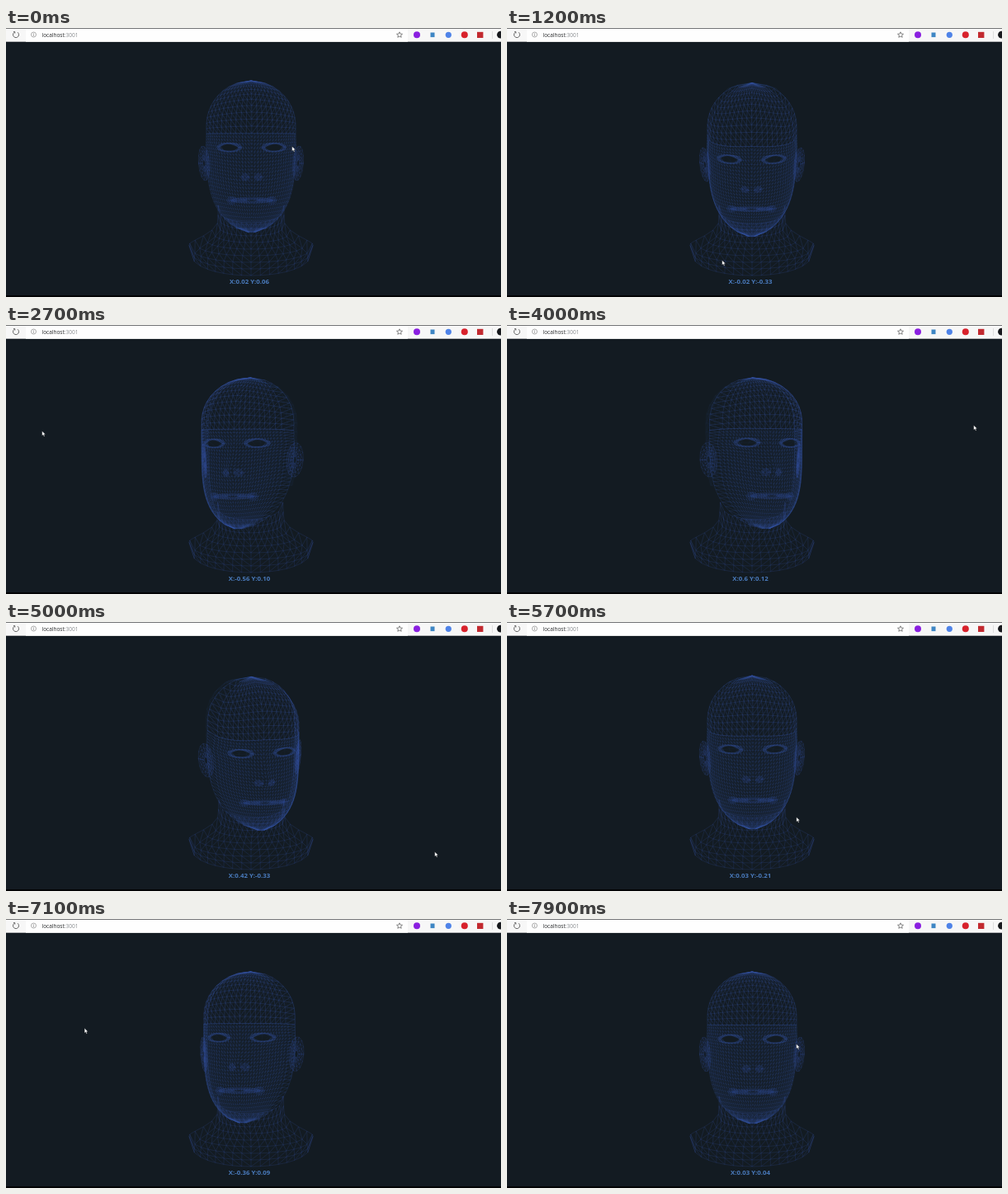
Recreate the animation shown at these times as an HTML page with a canvas. Size 600 by 326 pixels, loop 8000 ms.

```html
<!DOCTYPE html>
<html lang="en">
<head>
<meta charset="utf-8">
<title>Head follows the pointer</title>
<style>
  html, body { margin: 0; width: 100%; height: 100%; overflow: hidden; background: #131b22; }
  #stage { position: relative; width: 600px; height: 326px; overflow: hidden; }
  #stage > * { position: absolute; left: 0; top: 0; }
  text { font-family: "Open Sans", "Noto Sans", sans-serif; }
</style>
</head>
<body>
<div id="stage">
  <canvas id="view" width="600" height="326"></canvas>
  <svg width="600" height="326" viewBox="0 0 600 326">
    <rect width="600" height="16.7" fill="#f7f7f7"/>
    <rect x="24" y="1" width="463" height="15.7" fill="#fefefe"/>
    <rect width="600" height=".7" fill="#3a3c3e"/>
    <rect y="324" width="600" height="2" fill="#020304"/>
    <g fill="none" stroke="#555" stroke-width=".9">
      <path d="M9.8 5.4A3.5 3.5 0 1 0 14 5.2M9 4.6h1.8v1.9"/>
      <circle cx="33.5" cy="8" r="3" stroke="#888" stroke-width=".7"/>
      <path d="M33.5 7.5v2.2M33.5 6v.7" stroke="#777" stroke-width=".7"/>
      <path d="M477 4.8l1 2.3 2.5.2-1.9 1.6.6 2.4-2.2-1.3-2.2 1.3.6-2.4-1.9-1.6 2.5-.2z" stroke-width=".7"/>
      <path d="M589.5 4v9" stroke="#ccc" stroke-width=".6"/>
    </g>
    <text x="43.5" y="10.6" font-size="6.5" fill="#26282a">localhost<tspan fill="#85898c">:3001</tspan></text>
    <circle cx="498" cy="8.3" r="4" fill="#8a1fe0"/>
    <rect x="514.5" y="5.5" width="5" height="5.6" fill="#3f86c4"/>
    <circle cx="536.3" cy="8.3" r="3.6" fill="#4f83e8"/>
    <circle cx="555.8" cy="8.3" r="4" fill="#d8222c"/>
    <rect x="571" y="4.8" width="7.4" height="7.2" fill="#c22a30"/>
    <circle cx="599.5" cy="8.2" r="4.4" fill="#16181c"/>
    <text id="label" x="295" y="310" font-size="7.85" font-weight="700" fill="#4a7bbd" text-anchor="middle"></text>
    <path id="pointer" d="M0 0L0 5.8L1.4 4.7L2.3 6.8L3.3 6.4L2.4 4.3L4.1 4.1Z" fill="#fff" stroke="#0a0d10" stroke-width=".35"/>
  </svg>
</div>
<script>
const LOOP = 8000, STEP = 100, CX = 297, PIVOT = 195;

const clamp = v => Math.max(0, Math.min(1, v));
const smooth = v => (v = clamp(v)) * v * (3 - 2 * v);
const bump = (d, s) => Math.exp(-d * d / (2 * s * s));

// Pointer path: time, x, y
const path = [
  [0, 347, 144], [600, 325, 215], [1200, 261, 282], [1800, 86, 195], [2300, 45, 136],
  [2700, 44, 129], [3300, 300, 124], [4000, 566, 122], [4500, 565, 220], [5000, 520, 279],
  [5500, 420, 262], [6400, 94, 136], [6900, 52, 130], [7900, 351, 152]
];
const pathAt = (t, col) => {
  const last = path.length - 1;
  if (t >= path[last][0]) return path[last][col];
  const slope = i => {
    const a = path[Math.max(i - 1, 0)], b = path[Math.min(i + 1, last)];
    return (b[col] - a[col]) / (b[0] - a[0]);
  };
  const i = path.findIndex(p => p[0] > t) - 1;
  const [p, q] = [path[i], path[i + 1]], d = q[0] - p[0], s = (t - p[0]) / d, r = 1 - s;
  return p[col] * (1 + 2 * s) * r * r + slope(i) * d * s * r * r
       + q[col] * s * s * (3 - 2 * s) - slope(i + 1) * d * s * s * r;
};
const readX = x => Math.sign(x - 300) * .755 * Math.abs((x - 300) / 300) ** 1.9;
const readY = y => .00285 * (164.5 - y);

// Head profile by height: a round dome above TEMPLE, a tapering jaw below.
const TOP = 64, TEMPLE = 118, CHIN = 248, BROW = 128;
const dome = y => Math.sqrt(clamp(1 - (Math.max(0, TEMPLE - y) / (TEMPLE - TOP)) ** 2));
const jaw = y => clamp((y - TEMPLE) / (CHIN - TEMPLE));
const width = y => 54 * dome(y) * (1 - jaw(y) ** 4) ** .6;
const front = y => 74 * dome(y) + 5 * bump(y - 209, 25) - 14 * jaw(y) ** 8;
const middle = y => 52 * jaw(y) ** 4;
const back = y => -75 * dome(y) * (1 - .4 * jaw(y) ** 2);
const pitchShare = y => 1 - .55 * smooth((y - 160) / 90);

const nose = y => 15 * clamp((y - 138) / 40) ** 2 * clamp((192 - y) / 14);
const round = u => (1 - Math.min(1, Math.abs(u)) ** 4) ** .4;
const surface = (x, y) => {
  const c = middle(y), side = Math.abs(x);
  return c + (front(y) - c) * round(x / Math.max(.01, width(y))) + nose(y) * bump(x, 7)
    + 3 * bump(side - 20, 12) * bump(y - 132, 5) - 5 * bump(side - 27, 9) * bump(y - 145, 6)
    + 3 * bump(x, 15) * bump(y - 209, 6);
};

// Mesh lines flow around the eye openings.
const eyes = [-27, 27].map(x => ({ x, y: 145, rx: 11, ry: 3.4 }));
const reach = (e, x, y) => Math.hypot((x - e.x) / e.rx, (y - e.y) / e.ry);
const openEyes = (x, y) => {
  for (const e of eyes) {
    const r = Math.max(.05, reach(e, x, y)), k = Math.cbrt(1 + r ** 3) / r;
    if (r > 5) continue;
    x = e.x + (x - e.x) * k;
    y = e.y + (y - e.y) * k;
  }
  return [x, y];
};
const inEye = (a, b) => eyes.some(e => reach(e, (a.x + b.x) / 2, (a.y + b.y) / 2) < .85);

const points = [], patches = [];
const vertex = (x, y, z, m = 1) => {
  const p = { x, y, z, m, share: pitchShare(y) };
  points.push(p);
  return p;
};
const onFace = (x, y) => vertex(x, y, surface(x, y));

// Triangulated grid; at(u, v) returns a vertex.
const addGrid = (rows, cols, alpha, at, diagonals = true) => {
  const g = Array.from({ length: rows + 1 }, (_, i) =>
    Array.from({ length: cols + 1 }, (_, j) => at(i / rows, j / cols)));
  const lines = g.map((row, i) => {
    const edges = [], add = (a, b) => inEye(a, b) || edges.push([a, b]);
    row.forEach((p, j) => {
      if (j < cols) add(p, row[j + 1]);
      if (i < rows) add(p, g[i + 1][j]);
      if (diagonals && i < rows && j < cols)
        j < cols / 2 ? add(p, g[i + 1][j + 1]) : add(row[j + 1], g[i + 1][j]);
    });
    return edges;
  });
  patches.push({ lines, alpha });
};

// Column position from -1 to 1, a little denser at the sides
const across = v => (v = 2 * v - 1) * (1.2 - .2 * v * v);

// Cranium, face, back of the head
const lastTurn = Math.acos((TEMPLE - BROW) / (TEMPLE - TOP));
addGrid(11, 20, .42, (u, v) => {
  const s = across(v);
  const y = TEMPLE - (TEMPLE - TOP) * Math.cos(u * lastTurn) + 8 * Math.sin(Math.PI * u) * s * s;
  return onFace(width(y) * s, y);
});
addGrid(27, 34, .32, (u, v) => {
  const s = across(v), y = BROW + (CHIN - .5 - BROW) * u - 9 * Math.sin(Math.PI * u) * s * s;
  return onFace(...openEyes(width(y) * s, y));
});
addGrid(12, 14, .1, (u, v) => {
  const s = across(v), y = TOP + 130 * u;
  return vertex(width(y) * s, y, middle(y) + (back(y) - middle(y)) * Math.sqrt(1 - s * s));
});

// Neck and shoulders
addGrid(8, 16, .36, (u, v) => {
  const s = across(v), c = Math.sqrt(1 - s * s);
  const x = 40 + 35 * smooth((u - .2) / .6), y = 215 + 49 * (1 - (1 - u) ** 2);
  return vertex(x * s, y + (236 + 64 * u - y) * c ** .7, 5 + 22 * c, .6 * clamp(1 - 1.9 * u));
});

// Concentric loops lying on the face
const addRings = (x, y, rx, ry, from, rows, cols, alpha) =>
  addGrid(rows, cols, alpha, (u, v) => {
    const s = from + (1 - from) * u, a = v * 2 * Math.PI;
    return onFace(x + rx * s * Math.cos(a), y + ry * s * Math.sin(a));
  }, false);

for (const side of [-1, 1]) {
  addRings(27 * side, 145, 15, 5.6, .78, 2, 22, .5);
  addRings(8 * side, 181, 5, 4, .35, 2, 12, .36);
  addRings(24 * side, 209, 6, 4.5, .1, 3, 12, .34);
  addGrid(3, 14, .36, (u, v) => {
    const s = 1 - u * .8, a = v * 2 * Math.PI, out = s * Math.cos(a), down = s * Math.sin(a);
    return vertex(side * (57 + 6.5 * out - 1.5 * down), 164 + 21 * down, 6 - 14 * out);
  });
}
addRings(0, 209, 25, 3.6, .3, 2, 26, .34);

const ctx = document.getElementById('view').getContext('2d');
const label = document.getElementById('label');
const pointer = document.getElementById('pointer');

const project = (p, yaw, pitch) => {
  const a = yaw * p.m, b = pitch * p.m * p.share;
  const z = p.z * Math.cos(a) - p.x * Math.sin(a);
  p.sx = CX + p.x * Math.cos(a) + p.z * Math.sin(a);
  p.sy = PIVOT + (p.y - PIVOT) * Math.cos(b) + z * Math.sin(b);
};

const hundredths = v => Math.round(v * 100) / 100 + 0;

const draw = t => {
  const px = pathAt(t, 1), py = pathAt(t, 2), X = readX(px), Y = readY(py);
  for (const p of points) project(p, X * .5, (.05 - Y) * .5);
  ctx.fillStyle = '#131b22';
  ctx.fillRect(0, 0, 600, 326);
  ctx.strokeStyle = '#34529f';
  ctx.lineWidth = .6;
  for (const { lines, alpha } of patches) {
    ctx.globalAlpha = alpha;
    for (const edges of lines) {
      ctx.beginPath();
      for (const [a, b] of edges) {
        ctx.moveTo(a.sx, a.sy);
        ctx.lineTo(b.sx, b.sy);
      }
      ctx.stroke();
    }
  }
  ctx.globalAlpha = 1;
  label.textContent = `X:${hundredths(X)} Y:${hundredths(Y).toFixed(2)}`;
  pointer.setAttribute('transform', `translate(${px - .3} ${py - .6})`);
};

const start = performance.now();
let shown = -1;
const tick = () => {
  const t = Math.floor(((performance.now() - start) % LOOP) / STEP) * STEP;
  if (t !== shown) draw(shown = t);
  requestAnimationFrame(tick);
};
tick();
</script>
</body>
</html>
```
